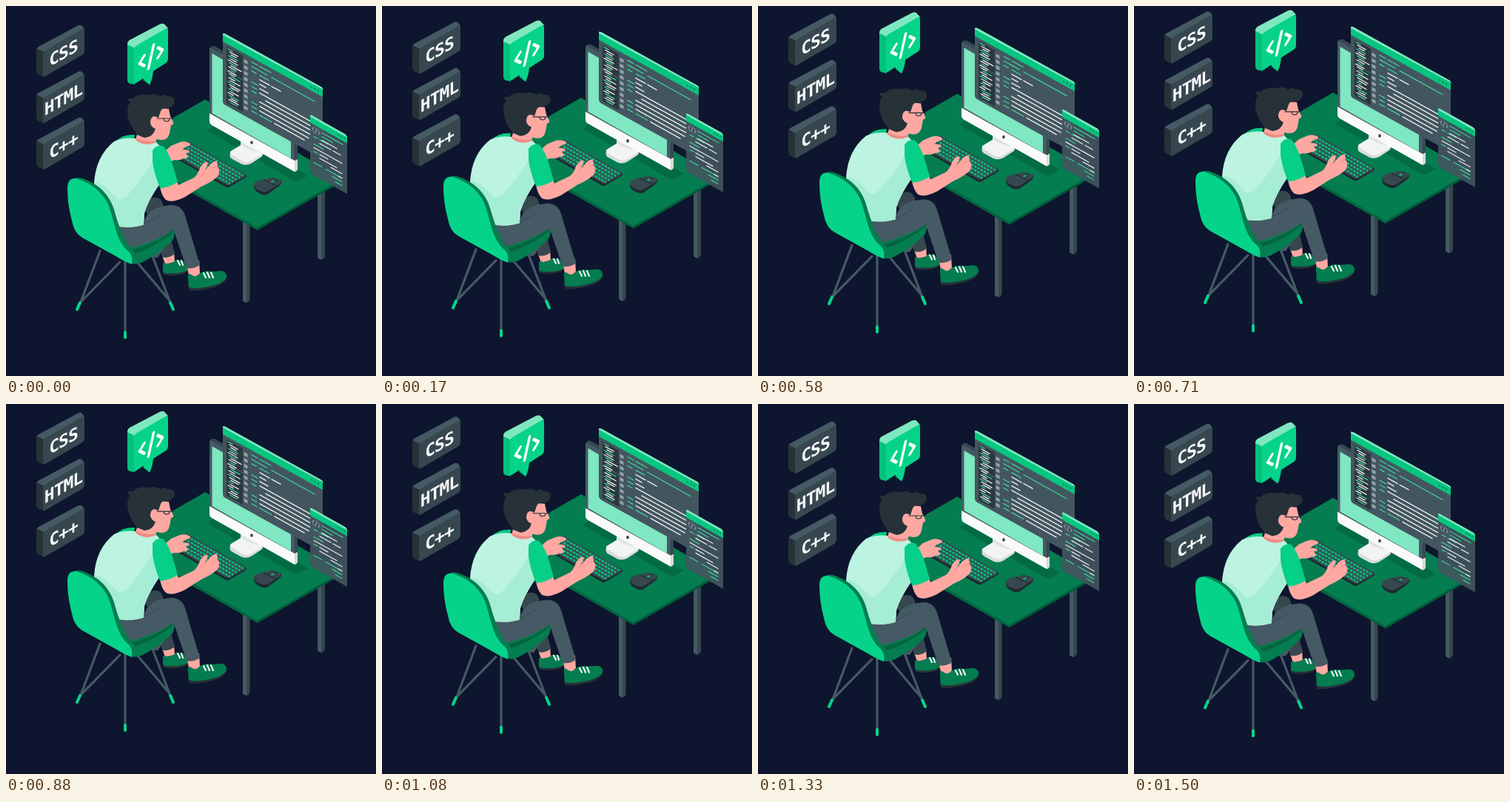
These frames come from a looping animation (500x500 px, 1.54 s). An HTML page:

```html
<!DOCTYPE html>
<html lang="en">
<head>
<meta charset="utf-8">
<title>Developer at a desk</title>
<style>
  html, body { margin: 0; height: 100%; overflow: hidden; background: #0d162e; }
  svg { display: block; width: 100vw; height: 100vh; }
  text { font: bold 23px "DejaVu Sans Mono", monospace; letter-spacing: -1px; fill: #fafafa; }
  .line { fill: none; stroke-linecap: round; stroke-linejoin: round; }
  .mint { stroke: #3fdca4; } .white { stroke: #f0f4f4; }
</style>
</head>
<body>
<svg viewBox="0 0 500 500">
  <g id="floating">
    <g id="labels"></g>
    <g id="bubble">
      <path fill="#05c07b" d="M164 52Q164 48 168 49L174 54V106L168 105Q164 104 164 100Z"/>
      <path fill="#02935e" d="M185 100L189 96L198 92L194 106.500Z"/>
      <path fill="#7fe7c0" d="M164 52Q164 48 167 46L208 24.500Q212 23 214 24.500L219 30L174 57Z"/>
      <path fill="#06d38a" d="M173 59Q173 55 177 53L215 31Q219 29 219 33V71Q219 75 216 77L199 88Q198 99 194 106.500L185 98L176 104Q173 106 173 102Z"/>
      <path class="line" stroke="#fff" stroke-width="3.700" transform="matrix(1 -.577 0 1 196 68.500)"
        d="M-9-7L-15.500 0L-9 7M3.500-14L-3.500 14M9-7L15.500 0L9 7"/>
    </g>
  </g>

  <g id="scene">
    <g id="table">
      <path fill="#455a64" d="M320 285H326V401Q320 400 320 397ZM421 245H427V343Q421 342 421 339Z"/>
      <path fill="#37474f" d="M325 285H329.500V396Q329 400 325 401ZM426 245H431V338Q430 342 426 343Z"/>
      <path fill="#015b39" d="M154 193L340 299L455 233V237L340 303L154 197Z"/>
      <path fill="#036540" d="M154 193L340 299V303L154 197Z"/>
      <path fill="#047d50" d="M269 126.200L455 233.500L340 299.500L154 192.500Z"/>
      <path fill="#026b44" d="M272 168L284 159L408 229L392 238Z"/>
    </g>

    <g id="monitor">
      <path fill="#d9dcdc" d="M303 199Q301 204 306 207L319 214Q325 216 331 213L345 204Q348 202 347 197Z"/>
      <path fill="#f2f3f3" d="M304 196L317 188L318 178L342 192L341 196Q348 198 345 201L330 210Q325 212 320 210L305 201Q301 198 304 196Z"/>
      <path fill="#e0e3e3" d="M318 178L342 192L341 197Q329 196 317 187Z"/>
      <path fill="#37474f" d="M275 58Q275 55 279 54L282 54L394 119V212L275 148Z"/>
      <path fill="#455a64" d="M275 59Q275 56 278 57L390 121V210L275 147Z"/>
      <path fill="#7fe7c1" d="M278.500 64L385 126V206L278.500 145Z"/>
      <path fill="#fafafa" d="M275 145L390 209V224L278 161Q275 159 275 156Z"/>
      <path fill="#d5dada" d="M390 209L394 207V220Q394 223 390 224Z"/>
      <ellipse cx="332" cy="184.500" rx="1.800" ry="2.300" fill="#37474f"/>
    </g>

    <g id="editor" transform="matrix(1 .555 0 1 293 38)">
      <path fill="#43565f" d="M0 0H135V94H3Q0 94 0 91Z"/>
      <path fill="#07c680" d="M0 0H135V10H0Z"/>
      <path fill="#7fe7c1" d="M0 1V-1L3-2.500H134L136 0Z"/>
      <path class="line" stroke="#04764c" stroke-width="2.300" d="M120 5h0M124.500 5h0M129 5h0"/>
      <path fill="#2b383f" d="M5 14H27V46H5ZM5 48H27V90H5Z"/>
      <path stroke="#91a3ab" stroke-width="5" stroke-dasharray="4.500 3.300" d="M31 18V86"/>
      <g id="tree" class="line" stroke-width="1.400"></g>
      <path class="line mint" stroke-width="1.300" d="M39 16H47M50 16H65M39 22H60M66 22H124M39 28H45M50 28H62M39 43H47M39 49H46M39 55H45M39 70H46M39 76H46M39 82H46M50 82H66"/>
      <path class="line white" stroke-width="1.500" d="M50 34H63M66 34H78M50 40H58M50 46H61M50 52H118M58 58H118M50 64H118M50 70H118M50 76H116M70 82H110"/>
    </g>

    <g id="preview" transform="matrix(1 .56 0 1 411 148.500)">
      <path fill="#43565f" fill-opacity=".9" d="M0 0H50V77.500H2Q0 77.500 0 75Z"/>
      <path fill="#07c680" d="M0 0H50V9H0Z"/>
      <path fill="#7fe7c1" d="M0 1V-1L2-2H48L50 0V1Z"/>
      <path class="line" stroke="#04764c" stroke-width="2" d="M38 4.500h0M42 4.500h0M46 4.500h0"/>
      <path class="line" stroke="#8ba0a8" stroke-width="1" d="M5 13L3 16L5 19M9 12L7 20M11 13L13 16L11 19"/>
      <path class="line mint" stroke-width="1.200" d="M16 14H44M16 19H30M5 25H10M13 25H24M5 35H18M5 45H10M5 60H16M21 60H43M30 65H43M34 70H43"/>
      <path class="line white" stroke-width="1.300" d="M16 24H36M13 30H28M31 30H41M5 40H27M13 45H24M13 50H36M26 40H43M28 54H43M38 60H43"/>
    </g>

    <g id="keyboard">
      <path fill="#1b262c" d="M223 198L300 242L325 228V231L301 245Q299 246 296 244L223 202Z"/>
      <path fill="#37474f" d="M246 183L323 227Q326 229 323 231L302 242Q299 243 296 241L224 200Q221 198 225 196L242 184Q244 182 246 183Z"/>
      <g id="keys" stroke="#08b879" stroke-width="2.900" stroke-dasharray="3.700 1.200"></g>
    </g>

    <g id="mouse">
      <path fill="#1e292f" d="M335 243Q336 238 345 236L360 232L372 236Q373 240 368 244L354 254Q349 257 342 253Q335 250 335 243Z"/>
      <path fill="#37474f" d="M335 241Q337 236 346 235L359 232L372 236Q372 239 367 242L354 250Q349 253 342 249Q335 246 335 241Z"/>
      <path class="line" stroke="#18242a" stroke-width="1" d="M348 235L365 243M358 239L366 234"/>
      <path class="line" stroke="#08c581" stroke-width="1.800" d="M359 238L362 236.500"/>
    </g>

    <path id="farHand" fill="#ffa8a2" d="M215 196L223 189L235 184Q244 182 249 186Q250 189 243 190L238 194L247 195Q249 198 243 199L246 203Q247 206 240 206Q235 209 228 208L219 211Z"/>

    <g id="chairLegs" class="line" stroke-width="3.200">
      <path stroke="#455a64" d="M127 331L101 400M154 346L102 399M161 344V440M177 346L221 398M198 338L222 401"/>
      <path stroke="#06d38a" stroke-width="4" d="M100 401L96 410M161 441V448M222 401L226 410"/>
    </g>

    <g id="farLeg">
      <path fill="#ffa8a2" d="M210 334L227 331L228 346L215 349Z"/>
      <path fill="#37474f" d="M187 274Q190 258 203 259Q212 260 213 274L228 335Q219 342 211 339L204 305Z"/>
      <path fill="#263238" d="M212 356H246V358Q238 365 222 364Q213 364 212 361Z"/>
      <path fill="#047d50" d="M212 348Q213 346 217 348Q224 349 230 343L239 344L246 352V357Q236 362 222 361Q213 362 212 358Z"/>
      <path class="line" stroke="#fff" stroke-width="2" d="M232 344L235 350M237 344L239 350"/>
    </g>

    <g id="body">
      <path fill="#06c983" d="M148 183Q158 173 174 174L173 182Z"/>
      <path fill="#bcf3e1" d="M146 183Q158 177 175 179Q190 190 203 184Q212 191 212 205L208 240Q192 263 187 280L186 296Q165 302 148 298L119 240Q121 203 146 183Z"/>
      <path fill="#a6edd5" d="M119 238Q132 239 146 256Q154 266 163 257Q181 239 200 207L207 240Q191 262 187 280L186 296Q165 302 148 298Z"/>
      <path fill="#ffa8a2" d="M244 346L261 344L262 362L253 368L247 364Z"/>
      <path fill="#455a64" d="M150 298Q170 301 186 296Q188 277 209 271L222 269Q237 268 242 283L262 350Q253 356 244 354L228 307L205 340L168 338Z"/>
      <path class="line" stroke="#37474f" stroke-width="1" d="M187 293Q201 289 210 280"/>
      <path fill="#263238" d="M246 375L298 366V369Q293 378 274 382Q256 386 247 384Z"/>
      <path fill="#047d50" d="M246 367Q245 362 249 362Q256 369 262 361Q269 357 278 359Q286 358 292 358Q299 360 298 367Q292 376 274 379Q256 383 247 380Z"/>
      <path class="line" stroke="#fff" stroke-width="2" d="M267 361L270 367M272 360L275 367M277 360L280 367"/>
    </g>

    <g id="chair">
      <path fill="#047d50" d="M160 329Q200 320 227 302Q229 314 223 319Q207 334 185 346Q172 352 163 345Z"/>
      <path fill="#036540" d="M167 330Q203 321 227 302V305Q205 324 170 336Z"/>
      <path fill="#047d50" d="M92 233Q99 230 109 235Q137 247 146 275Q157 316 172 331Q181 341 170 349L150 335Z"/>
      <path fill="#06d38a" d="M83 246Q83 232 95 233Q126 243 138 268C147 290 148 318 166 332Q172 338 170 349Q161 346 150 339L103 313Q92 307 89 290Q83 268 83 246Z"/>
    </g>

    <g id="arm">
      <path fill="#ffa8a2" d="M208 244L231 237L233 242L254 232Q259 228 262 219Q268 209 272 211Q274 213 268 223L277 213Q283 208 285 210L286 217Q290 221 287 229Q280 237 264 244L242 258Q224 267 216 262Q210 256 208 244Z"/>
      <path class="line" stroke="#ee8983" stroke-width=".8" d="M268 223L264 230M279 219L286 217"/>
      <path fill="#06cf87" d="M198 195Q204 187 212 189Q220 197 226 217L232 238Q219 246 208 246Q200 226 198 210Z"/>
    </g>

    <g id="head">
      <path fill="#ffa8a2" d="M178 170L202 150L205 138L220 139L222 149L226 157Q227 160 223 161L221 172Q219 181 210 181L203 180V184Q188 191 175 181Z"/>
      <path fill="#f08a85" d="M177 179Q190 185 203 182V184Q188 191 175 181Z"/>
      <path fill="#263238" d="M165 128Q163 124 171 125Q179 118 193 120Q202 117 208 122Q214 118 218 122Q228 121 228 129Q228 134 220 138Q211 137 209 142L206 151L202 150Q195 148 195 156Q196 164 202 166Q199 177 187 178L177 174Q164 158 164 143Q164 134 168 130Z"/>
      <path fill="#ffa8a2" d="M206 152Q200 146 196 152Q193 160 199 164Q205 165 206 160Z"/>
      <path class="line" stroke="#263238" stroke-width="1.200" d="M204 152L227 152M213 152Q213 156 217 156Q221 156 221 152"/>
    </g>
  </g>
</svg>
<script>
const find = id => document.getElementById(id);
const repeat = (count, draw) => Array.from({ length: count }, (_, i) => draw(i)).join('');

find('labels').innerHTML = ['CSS', 'HTML', 'C++'].map((word, i) => `
  <g transform="translate(0 ${i * 62.5})">
    <path fill="#455a64" d="M41 59Q41 57 44 55L98 26Q101 25 103 27L106 31L51 63Z"/>
    <path fill="#263238" d="M41 59Q41 57 43 58L51 62V96L44 93Q41 91 41 89Z"/>
    <path fill="#37474f" d="M50 65Q50 62 53 60L102 32Q106 29 106 33V61Q106 64 103 66L53 95Q50 97 50 93Z"/>
    <text text-anchor="middle" transform="matrix(1 -.577 0 1 77.500 71.500)">${word}</text>
  </g>`).join('');

find('tree').innerHTML = repeat(25, i =>
  `<path class="${i % 3 ? 'white' : 'mint'}" d="M${7 + i * 7 % 5} ${16 + i * 2.95}h${6 + i * 5 % 9}"/>`);

find('keys').innerHTML = repeat(5, i =>
  `<path d="M${245.5 - i * 4.4} ${186.5 + i * 2.8}l75 42.700"/>`);

const LOOP = 1540, STEPS = 37, TOP_TIME = 705;

// Triangle wave: 1 at the highest pose, 0 at the lowest.
function lift(time) {
  const phase = ((time - TOP_TIME) / LOOP % 1 + 1) % 1;
  return Math.abs(2 * phase - 1);
}

function render() {
  const step = Math.floor(performance.now() % LOOP / LOOP * STEPS + 0.1);
  const rise = lift(step * LOOP / STEPS) - lift(0);
  find('scene').setAttribute('transform', `translate(0 ${-10 * rise})`);
  find('floating').setAttribute('transform', `translate(0 ${-20 * rise})`);
  requestAnimationFrame(render);
}
render();
</script>
</body>
</html>
```
